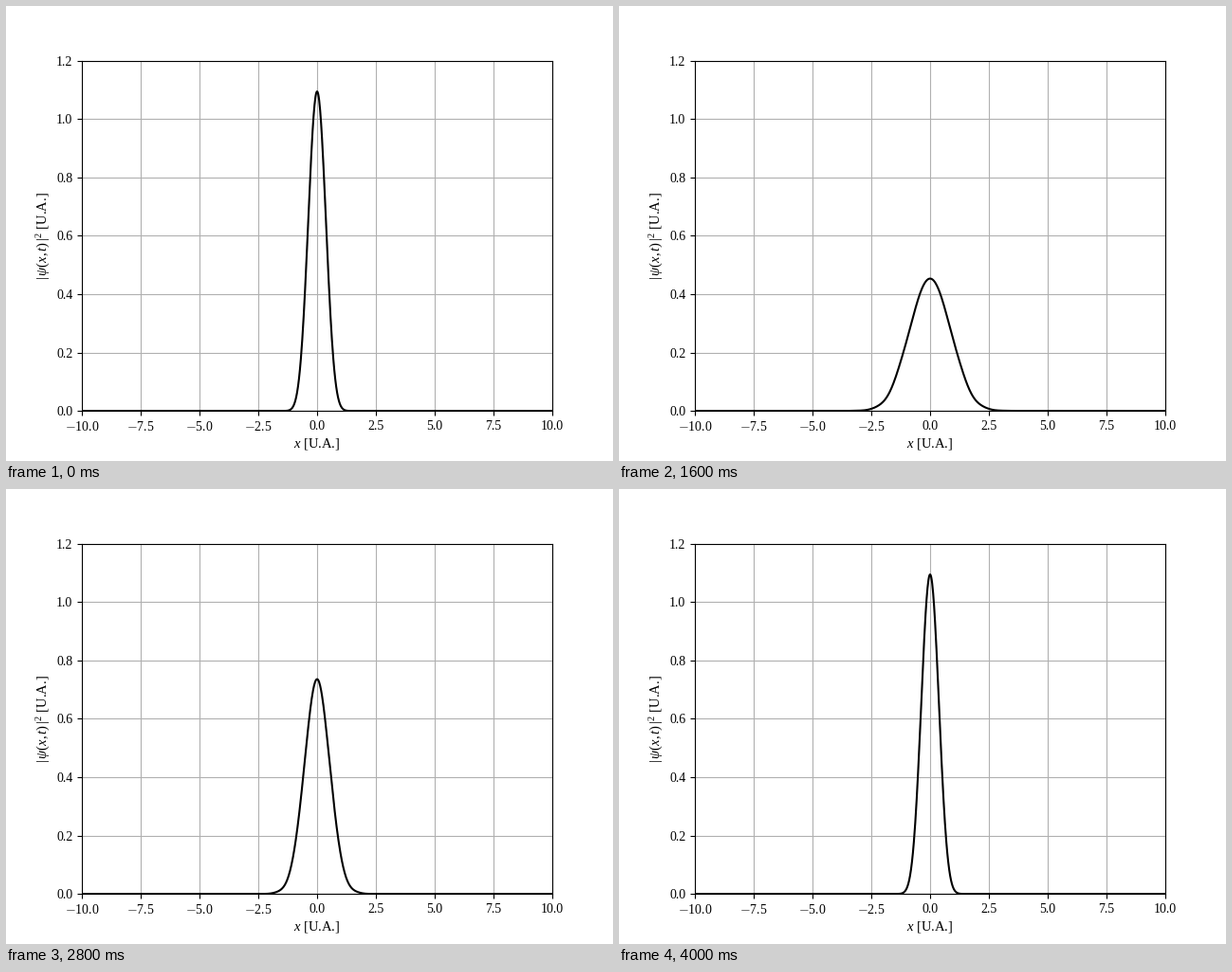
Write a matplotlib script that moves like this. It is 640 by 480 pixels and loops after 4.02 s.

```python
import math

import numpy as np
import matplotlib.pyplot as plt
from matplotlib.animation import FuncAnimation

FRAMES = 201
LEVELS = 11      # oscillator states kept in the expansion
SQUEEZE = 0.6    # (r - 1) / (r + 1) for a width ratio r = 4

plt.rcParams.update({
    "font.family": "Liberation Serif",
    "mathtext.fontset": "custom",
    "mathtext.rm": "Liberation Serif",
    "mathtext.it": "Liberation Serif:italic",
})


def oscillator_states(x, count):
    """Harmonic oscillator eigenfunctions with m = omega = hbar = 1."""
    states = [math.pi ** -0.25 * np.exp(-x ** 2 / 2)]
    states.append(math.sqrt(2) * x * states[0])
    for n in range(2, count):
        states.append(math.sqrt(2 / n) * x * states[-1]
                      - math.sqrt((n - 1) / n) * states[-2])
    return np.array(states)


def coefficient(n):
    """Overlap of the narrow Gaussian with even state 2n."""
    norm = (1 - SQUEEZE ** 2) ** 0.25
    return (norm * (-SQUEEZE) ** n * math.sqrt(math.factorial(2 * n))
            / (2 ** n * math.factorial(n)))


x = np.linspace(-10, 10, 1000)
even = np.arange(0, LEVELS, 2)
terms = (np.array([coefficient(n // 2) for n in even.tolist()])[:, None]
         * oscillator_states(x, LEVELS)[even])


def density(t):
    psi = np.exp(-1j * (even + 0.5) * t) @ terms
    return np.abs(psi) ** 2


def tick_text(value, _):
    return ("$-$" if value < 0 else "") + f"{abs(value):.1f}"


fig, ax = plt.subplots(figsize=(6.4, 4.8), dpi=100)
ax.set(xlim=(-10, 10), ylim=(0, 1.2), xticks=np.arange(-10, 10.1, 2.5))
ax.grid(True)
for axis in (ax.xaxis, ax.yaxis):
    axis.set_major_formatter(tick_text)
for label in ax.get_xticklabels():
    label.set_math_fontfamily("cm")

fig.text(328 / 640, 1 - 465 / 480, "$x$ [U.A.]", size=10.5,
         ha="center", va="baseline")
fig.text(43.5 / 640, 1 - 242.5 / 480, r"$|\,\psi(x,t)\,|^2$ [U.A.]", size=10.5,
         ha="center", va="baseline", rotation=90, rotation_mode="anchor")

curve, = ax.plot(x, density(0), color="black", lw=1.5)


def update(frame):
    curve.set_ydata(density(3 * math.pi * frame / (FRAMES - 1)))
    return curve,


anim = FuncAnimation(fig, update, frames=FRAMES, interval=20,
                     repeat=True, repeat_delay=0)
plt.show()
```
